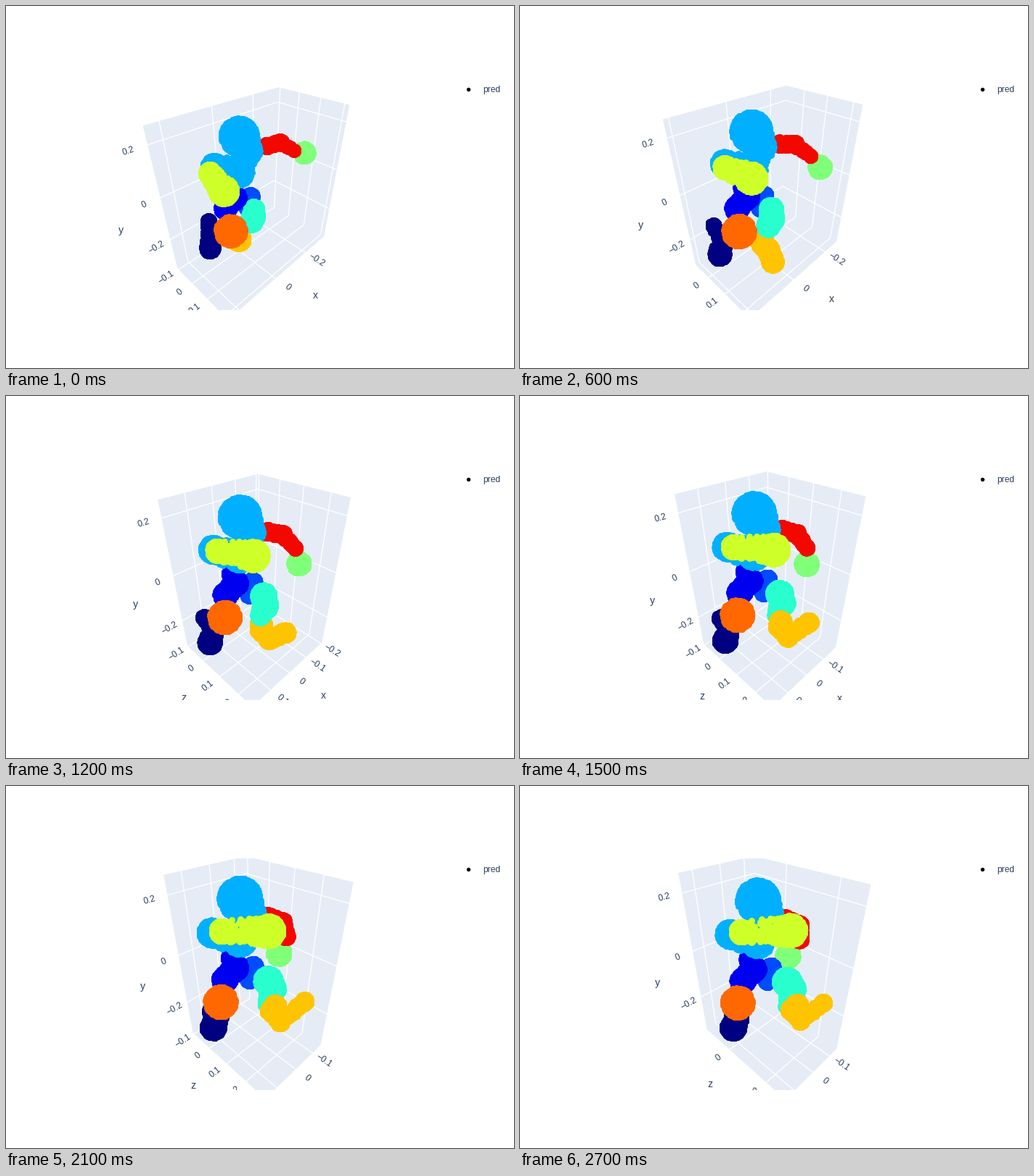
A matplotlib script that plays this animation: 700 px wide and 500 px high, repeating every 3000 ms.

```python
import math

import matplotlib.pyplot as plt
import numpy as np
from matplotlib.animation import FuncAnimation

FRAMES, INTERVAL = 10, 300
DPI = 100
PX = 72 / DPI  # points per pixel
INK = "#2a3f5f"
SCENE = 80, 100, 607, 420  # left, top, right, bottom

plt.rcParams["font.family"] = "Liberation Sans"

# Camera on the diagonal of the scene, 45 degree field of view.
CENTER = 343.4, 260
FOCAL = 160 / math.tan(math.pi / 8)
DISTANCE = 1.25 * math.sqrt(3)


def project(points):
    """Model coordinates to screen x, screen y and depth."""
    x, y, z = np.moveaxis(np.asarray(points, float), -1, 0)
    depth = DISTANCE - (x + y + z) / math.sqrt(3)
    sx = CENTER[0] + FOCAL * (z - x) / math.sqrt(2) / depth
    sy = CENTER[1] - FOCAL * (2 * y - x - z) / math.sqrt(6) / depth
    return np.stack([sx, sy, depth], -1)


def pace(frame):
    """Progress of the movement, easing out."""
    return 1 - (1 - frame / (FRAMES - 1)) ** 1.6


def curve(points, u):
    """Bezier curve of any order; a single point stays put."""
    points = np.asarray(points, float)
    while len(points) > 1:
        points = points[:-1] * (1 - u) + points[1:] * u
    return points[0]


def data_range(frame):
    u = pace(frame)
    z_low = np.interp(frame, [0, 2, 4, 8, 9], [-.11, -.088, -.105, -.11, -.15])
    low = [curve([-.3485, -.314, -.155, -.146], u),
           curve([-.3675, -.296, -.374], u), z_low]
    high = [curve([.2527, .145], u),
            curve([.2614, .248, .258], u),
            curve([.2185, .205, .295, .288], u)]
    return np.array(low), np.array(high)


class Part:
    """A cloud of dots along a chain of nodes.

    A node is (radii, *points): its size and its path, both as curves,
    relative to the projected origin of the data.
    """

    def __init__(self, color, layer, *nodes, late_layer=None):
        rng = np.random.default_rng(10 + layer)
        count = 270 * (2 * len(nodes) - 1)
        along = rng.uniform(-.5, len(nodes) - .5, count)
        at_node = rng.uniform(size=count) < .5
        self.along = np.where(at_node, np.round(along), along)
        self.reach = np.sqrt(1 - rng.uniform(size=count) ** 2)
        self.angle = rng.uniform(0, 2 * math.pi, count)
        self.color, self.nodes = color, nodes
        self.layers = layer, layer if late_layer is None else late_layer

    def draw(self, ax, frame, origin, zoom):
        u = pace(frame)
        nodes = [(*curve(path, u), curve(np.atleast_1d(radii), u))
                 for radii, *path in self.nodes]
        x, y, r = (zoom * np.interp(self.along, range(len(nodes)), values)
                   for values in zip(*nodes))
        r = (r - 4.3) * self.reach
        ax.scatter(origin[0] + x + r * np.cos(self.angle),
                   origin[1] + y + r * np.sin(self.angle),
                   s=(9 * PX) ** 2, c=self.color, linewidths=0,
                   zorder=10 + self.layers[frame > 4])


PARTS = [
    # far hand and upper arm
    Part("#80ff79", 0, (17, (99, -43), (109, 1), (43, 5))),
    Part("#f30800", 1,
         (13, (45, -53), (39, -43)),
         (13, (64, -58), (63, -45), (58, -35)),
         ((10, 9, 13), (84, -46), (92, -24), (58, -17))),
    # hips and legs
    Part("#004cff", 2, (14, (21, 21)), (12, (16, 38))),
    Part("#000080", 3,
         ((12, 9, 15), (-40, 57), (-60, 60), (-25, 83)),
         ((14, 16), (-38, 75), (-37, 78), (-23, 86)),
         ((16, 18), (-38, 96), (-42, 106), (-28, 98))),
    Part("#ffc400", 4,
         ((17, 15), (4, 81), (24, 86), (55, 69)),
         ((18, 13), (3, 83), (30, 92), (46, 75)),
         ((18, 12), (4, 83), (43, 108), (59, 90)),
         ((18, 12), (4, 83), (20, 160), (90, 55), (89, 66)), late_layer=6),
    Part("#29ffce", 5,
         ((16, 20), (26, 40), (42, 39)),
         (18, (25, 50), (34, 56), (49, 48)),
         ((17, 18, 7), (22, 57), (37, 71))),
    Part("#0000f0", 7, (13, (-8, 10)), (17, (-1, 22)), (17, (-16, 38))),
    # head, chest and near shoulder
    Part("#00b0ff", 8,
         (30, (4, -67)), (20, (19, -46)), (23, (4, -14)), (20, (-32, -23))),
    Part("#ff6800", 9, ((25, 23), (-8, 71), (-22, 66))),
    # near arm across the chest
    Part("#ceff29", 10,
         (17, (-38, -13), (-29, -20), (-17, -26)),
         (23, (-18, 13), (16, -13), (46, -28))),
]

# Each grid line runs over two walls; signs are multiples of the half size.
PATHS = [
    [(0, 1, -1), (0, -1, -1), (0, -1, 1)],
    [(1, 0, -1), (-1, 0, -1), (-1, 0, 1)],
    [(-1, 1, 0), (-1, -1, 0), (1, -1, 0)],
]
LABEL_END = [2, 0, 2]
OUTWARD = [2, 0, 0]
OUTLINE = [(1, 1, -1), (-1, 1, -1), (-1, 1, 1),
           (-1, -1, 1), (1, -1, 1), (1, -1, -1)]


def ticks(low, high):
    step = .1 if high - low < .41 else .2
    return step * np.arange(math.ceil(low / step), math.floor(high / step) + 1)


def tick_text(value):
    return "0" if abs(value) < .01 else f"{value:.1f}".replace("-", "\u2212")


def draw_label(ax, point, outward, text, gap, size, rotate):
    """Place text beyond a box edge, along the outward axis."""
    sx, sy, depth = project(point)
    dx, dy = (project(point + outward * .01) - (sx, sy, depth))[:2]
    reach = gap / depth / math.hypot(dx, dy)
    angle = math.degrees(math.atan(-dy / dx)) if rotate else 0
    ax.text(sx + dx * reach, sy + dy * reach, text, size=size * PX, color=INK,
            ha="center", va="center", rotation=angle, rotation_mode="anchor",
            clip_on=True, zorder=30)


def draw_box(ax, low, high, scale):
    half, middle = (high - low) * scale / 2, (high + low) / 2
    ax.fill(*project(OUTLINE * half).T[:2], color="#e5ecf6", lw=0, zorder=1)
    for axis, path in enumerate(PATHS):
        end, outward = LABEL_END[axis], np.eye(3)[OUTWARD[axis]]
        corners = path * half
        title_at = corners[end].copy()
        title_at[axis] = 0
        draw_label(ax, title_at, outward, "xyz"[axis], 130, 14, False)
        for value in ticks(low[axis], high[axis]):
            line = corners.copy()
            line[:, axis] = (value - middle[axis]) * scale
            ax.plot(*project(line).T[:2], color="white", lw=1.3 * PX, zorder=2)
            draw_label(ax, line[end], outward, tick_text(value), 47.5, 12, True)


def set_stage(ax, left, top, right, bottom):
    ax.set_position([left / 700, 1 - bottom / 500,
                     (right - left) / 700, (bottom - top) / 500])
    ax.set(xlim=(left, right), ylim=(bottom, top))
    ax.set_axis_off()


fig = plt.figure(figsize=(700 / DPI, 500 / DPI), dpi=DPI, facecolor="white")
legend = fig.add_axes([0, 0, 1, 1])
set_stage(legend, 0, 0, 700, 500)
legend.scatter([637.3], [114.5], s=(5.4 * PX) ** 2, c="black", linewidths=0)
legend.text(657.5, 119, "pred", size=12 * PX, color=INK, va="baseline")
scene = fig.add_axes([0, 0, 1, 1], label="scene")


def update(frame):
    scene.clear()
    set_stage(scene, *SCENE)
    low, high = data_range(frame)
    scale = np.prod(high - low) ** (-1 / 3)
    draw_box(scene, low, high, scale)
    *origin, depth = project(-(low + high) / 2 * scale)
    for part in PARTS:
        part.draw(scene, frame, origin, scale / depth)
    return []


anim = FuncAnimation(fig, update, frames=FRAMES, interval=INTERVAL,
                     init_func=lambda: [], repeat=True, repeat_delay=0)
plt.show()
```
